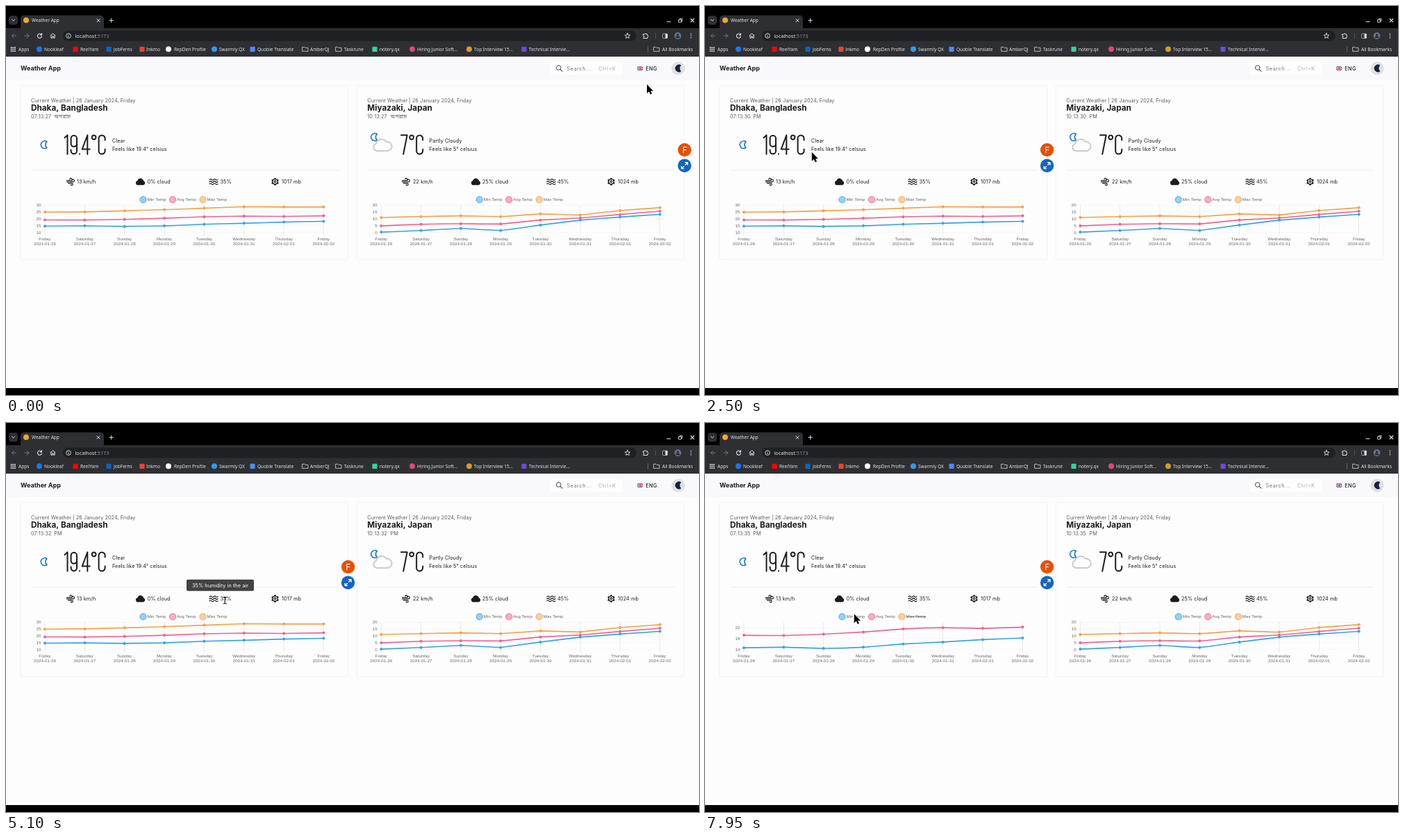
Write an HTML page with a canvas that moves like this. It is 998x561 px and loops after 8 s.

```html
<!DOCTYPE html>
<html lang="en">
<head>
<meta charset="utf-8">
<title>Weather App</title>
<style>
html, body { margin: 0; width: 100%; height: 100%; overflow: hidden; background: #000; }
canvas { display: block; width: 998px; height: 561px; }
</style>
</head>
<body>
<canvas id="stage"></canvas>
<script>
const W = 998, H = 561, LOOP = 8000;
const canvas = document.getElementById('stage');
const ctx = canvas.getContext('2d');
const dpr = window.devicePixelRatio || 1;
canvas.width = W * dpr;
canvas.height = H * dpr;

const INTER = 'Inter, sans-serif';
const UI = '"Noto Sans", sans-serif';
const CHART = '"Liberation Sans", sans-serif';
const INK = '#1d1d1f', GREY = '#5c5c60', BLUE = '#1976d2';

const clamp = v => Math.max(0, Math.min(1, v));
const mix = (a, b, k) => a + (b - a) * k;
const easeOutQuart = k => 1 - (1 - clamp(k)) ** 4;
const easeInOut = k => k * k * (3 - 2 * k);

function text(s, x, y, size, color, o = {}) {
  ctx.font = `${o.weight || 400} ${size}px ${o.family || INTER}`;
  ctx.letterSpacing = (o.spacing || 0) + 'px';
  ctx.textAlign = o.align || 'left';
  ctx.textBaseline = o.base || 'alphabetic';
  ctx.fillStyle = color;
  ctx.fillText(s, x, y);
}
const body = (s, x, y, color = INK) => text(s, x, y, 7.28, color, { spacing: 0.078 });

function box(x, y, w, h, fill, r = 0, line) {
  ctx.beginPath();
  ctx.roundRect(x, y, w, h, r);
  if (fill) { ctx.fillStyle = fill; ctx.fill(); }
  if (line) { ctx.strokeStyle = line; ctx.lineWidth = 0.6; ctx.stroke(); }
}

function disc(x, y, r, fill, line) {
  ctx.beginPath();
  ctx.arc(x, y, r, 0, 7);
  if (fill) { ctx.fillStyle = fill; ctx.fill(); }
  if (line) { ctx.strokeStyle = line; ctx.lineWidth = 0.9; ctx.stroke(); }
}

// Path relative to (x, y); stroked when a width is given, else filled
function shape(d, x, y, color, width) {
  ctx.save();
  ctx.translate(x, y);
  ctx.lineCap = ctx.lineJoin = 'round';
  const p = new Path2D(d);
  if (width) { ctx.strokeStyle = color; ctx.lineWidth = width; ctx.stroke(p); }
  else { ctx.fillStyle = color; ctx.fill(p); }
  ctx.restore();
}

const CLOUD = 'M-3.6 5A3.1 3.1 0 0 1-4.2-1.1A4.2 4.2 0 0 1 3-3.3A3 3 0 0 1 4.8-.6A2.9 2.9 0 0 1 4.3 5Z';
const MOON = 'M3.8 4.2A5.4 5.4 0 1 1 3.8-4.6A6 6 0 0 0 3.8 4.2Z';
const FOLDER = 'M-4-3h3l1 1h4v5h-8z';
const WAVE = 'q1.5-1.7 3 0t3 0t3 0t3 0';

const icons = {
  wind(x, y) {
    shape('M-5.5-1.6h6a1.6 1.6 0 1 0-1.6-1.8M-5.5.4h9.2a1.7 1.7 0 1 0-1.7-1.8M-3.5 2.5h5.3a1.5 1.5 0 1 1-1.5 1.7', x, y, INK, 1.2);
  },
  cloud(x, y) { shape(CLOUD, x, y, INK); },
  wave(x, y) {
    shape(`M-6-2.8${WAVE}M-6 .3${WAVE}M-6 3.4${WAVE}`, x, y, INK, 1.2);
  },
  gear(x, y) {
    for (let i = 0; i < 6; i++) {
      const a = i * Math.PI / 3 + Math.PI / 6;
      disc(x + 4 * Math.cos(a), y + 4 * Math.sin(a), 1.5, INK);
    }
    disc(x, y, 4.3, INK);
    disc(x, y, 3, '#fdfdfd');
    disc(x, y, 1.9, INK);
    disc(x, y, 0.8, '#fdfdfd');
  }
};

// Tall condensed numerals, 30 units high
const GLYPHS = {
  '1': ['M1 5L5 1.3V28.7', 8.5],
  '9': ['M10 13.5a4.2 4.2 0 0 1-8.4 0V6a4.2 4.2 0 0 1 8.4 0V24a4.2 4.2 0 0 1-8.4 0v-1.5', 13],
  '.': ['M1 28.3v.3', 3.7],
  '4': ['M8.6 28.7V1.3L1 21.5H12', 14],
  '7': ['M1 1.3H9.7L4.2 28.7', 12.3],
  '°': ['M1 4.4a2.9 3 0 1 1 5.8 0a2.9 3 0 1 1-5.8 0', 9.3],
  'C': ['M10.6 8.5V6a4.5 4.5 0 0 0-9 0V24a4.5 4.5 0 0 0 9 0V21.5', 12]
};
function bigText(s, x, y) {
  for (const c of s) {
    const [d, step] = GLYPHS[c];
    shape(d, x, y, INK, 2);
    x += step;
  }
}

// label, icon x, label x, icon colour, icon kind
const BOOKMARKS = [
  ['Nookleaf', 48, 55, '#1877f2', 'disc'],
  ['ReelYam', 100, 107, '#f00', 'square'],
  ['JobFerns', 148, 155, '#0a66c2', 'square'],
  ['Inkmo', 196, 202, '#ea4335', 'square'],
  ['RepDen Profile', 234, 242, '#fff', 'disc'],
  ['Swarmly QX', 300, 307, '#2f9be8', 'disc'],
  ['Quoble Translate', 355, 362, '#4c8bf5', 'square'],
  ['AmberQJ', 431, 438, '#c8c9cc', 'folder'],
  ['Taskrune', 479, 487, '#c8c9cc', 'folder'],
  ['notery.qx', 531, 538, '#34d399', 'square'],
  ['Hiring Junior Soft...', 585, 592, '#e0457b', 'disc'],
  ['Top Interview 15...', 667, 674, '#d99a2b', 'disc'],
  ['Technical Intervie...', 746, 753, '#6d4bd8', 'square'],
  ['All Bookmarks', 937, 945, '#c8c9cc', 'folder']
];

function drawBrowser() {
  const pale = '#e4e5e8', dim = '#75767b';
  box(0, 0, W, 73, '#000');
  box(4, 14, 13, 13, '#2e2f33', 4);
  shape('M-2-1L0 1L2-1', 10.5, 20.5, pale, 1);
  box(21, 13.5, 120, 24, '#2e2f33', 5);
  disc(29, 20.5, 4, '#e7a936');
  text('Weather App', 37, 23.2, 6.5, pale, { family: UI });
  shape('M-2-2L2 2M2-2L-2 2', 133, 20.8, pale, 1);
  shape('M-2.7 0H2.7M0-2.7V2.7', 151.7, 20.8, pale, 1);
  shape('M-2.5 2H2.5', 954.5, 20.8, pale, 1.1);
  shape('M-2.3-1h3.5v3.5h-3.5zM-1-1v-1.5h3.6v3.6h-1.2', 971.3, 20.8, pale, 0.9);
  shape('M-2.3-2.3L2.3 2.3M2.3-2.3L-2.3 2.3', 988.5, 20.8, pale, 1.2);

  box(0, 32, W, 41, '#2e2f33');
  shape('M3 0H-3M0-3L-3 0L0 3', 11.5, 43, dim, 1);
  shape('M-3 0H3M0-3L3 0L0 3', 30, 43, dim, 1);
  shape('M2.7-1.5A3.1 3.1 0 1 0 3 1M3-3.4V-1H.7', 48.5, 43, pale, 1.1);
  shape('M-3.4-.3L0-3.5L3.4-.3M-2.6-1V3.2H-.8V.8H.8V3.2H2.6V-1', 67.5, 43, pale, 1);
  box(82, 35.5, 826, 15, '#1f2023', 7.5);
  disc(90, 43, 3.4, null, pale);
  shape('M0-1.6v.1M0 0V1.7', 90, 43, pale, 0.9);
  text('localhost', 99.5, 45.6, 7.2, pale, { family: UI });
  const end = ctx.measureText('localhost').width;
  text(':5173', 99.5 + end, 45.6, 7.2, '#8f9095', { family: UI });
  shape('M0-3.8L1.1-1.2L3.8-1L1.7.8L2.4 3.5L0 2L-2.4 3.5L-1.7.8L-3.8-1L-1.1-1.2Z', 895, 43, pale, 0.9);
  shape('M-3-2.3h2a1 1 0 1 1 2 0h1.8v2a1 1 0 1 1 0 2v1.8h-5.8v-1.8a1 1 0 0 0 0-2z', 921, 43, pale, 1);
  box(935, 39, 0.7, 8, '#606166');
  box(945.5, 40, 7, 6.5, null, 1, pale);
  box(949.5, 40, 3, 6.5, pale);
  disc(967.5, 43, 4.9, '#66748a');
  disc(967.5, 41.5, 1.6, '#252a35');
  shape('M-3 3.2a3 3 0 0 1 6 0z', 967.5, 43, '#252a35');
  for (let i = -1; i < 2; i++) disc(986.5, 43 + i * 2.8, 0.8, pale);

  for (let i = 0; i < 9; i++)
    box(6.8 + (i % 3) * 2.6, 59 + Math.floor(i / 3) * 2.6, 1.7, 1.7, pale);
  text('Apps', 18, 64.9, 6.5, pale, { family: UI });
  for (const [name, ix, tx, color, kind] of BOOKMARKS) {
    if (kind === 'disc') disc(ix, 62.3, 4, color);
    else if (kind === 'square') box(ix - 3.6, 58.8, 7.2, 7.2, color, 1);
    else shape(FOLDER, ix, 62.3, color, 0.9);
    text(name, tx, 64.9, 6.55, pale, { family: UI });
  }
  box(924, 58, 0.7, 9, '#77787c');
}

function drawHeader() {
  box(0, 73, W, 478, '#fdfdfd');
  box(0, 73, W, 34, '#f9f9fc');
  text('Weather App', 21, 93, 9.05, INK, { weight: 700 });
  box(784, 81, 104, 18, '#fefefe', 2);
  disc(795.8, 89, 3.3);
  ctx.strokeStyle = '#444';
  ctx.lineWidth = 1;
  ctx.stroke();
  shape('M0 0L2.7 2.7', 798.3, 91.4, '#444', 1.1);
  text('Search...', 807.5, 93, 7.28, '#707074', { spacing: 0.6 });
  text('Ctrl+K', 853, 93, 7.28, '#a8a8ac', { spacing: 0.6 });
  box(909.3, 87, 7.8, 6, '#26407f', 0.8);
  shape('M-3.5-2.6L3.5 2.6M3.5-2.6L-3.5 2.6', 913.2, 90, '#fff', 0.9);
  shape('M-3.7 0H3.7M0-2.8V2.8', 913.2, 90, '#fff', 2);
  shape('M-3.7 0H3.7M0-2.8V2.8', 913.2, 90, '#d0213c', 1.1);
  text('ENG', 921.3, 93, 7.28, INK, { weight: 500, spacing: 0.4 });
  disc(968, 90, 9.6, '#dfe0e4');
  shape(MOON, 968.5, 90, '#17223b');
  box(0, 551, W, 10, '#000');
}

const DAYS = ['Friday', 'Saturday', 'Sunday', 'Monday', 'Tuesday', 'Wednesday', 'Thursday', 'Friday'];
const DATES = ['01-26', '01-27', '01-28', '01-29', '01-30', '01-31', '02-01', '02-02'];
const SERIES = [
  ['Min Temp', 141.5, '54,162,235'],
  ['Avg Temp', 184, '240,98,140'],
  ['Max Temp', 227.5, '248,160,72']
];
const FLOOR = 326.5, GAP = 57.34, HIDE_AT = 7080;

const CARDS = [
  {
    x: 21, place: 'Dhaka, Bangladesh', hour: '07', lead: 650, temp: '19.4°C', tempX: 83.5, noteX: 153,
    sky: 'Clear', feels: 'Feels like 19.4° celsius',
    facts: [['wind', 93, 102, '13 km/h'], ['cloud', 193.5, 203.5, '0% cloud'], ['wave', 299, 308.5, '35%'], ['gear', 387.5, 397, '1017 mb']],
    lo: 10, hi: 30, ticks: [10, 15, 20, 25, 30],
    data: [
      [14.6, 14.8, 14.4, 14.8, 16, 16.7, 17.6, 18.2],
      [19.2, 19.1, 19.6, 20.4, 21.5, 22, 21.75, 22.2],
      [24.9, 25.1, 25.9, 26.7, 27.8, 28.9, 28.7, 28.7]
    ],
    rescale: { lo: 14, hi: 24, ticks: [14, 18, 22] }
  },
  {
    x: 505.3, place: 'Miyazaki, Japan', hour: '10', lead: 590, temp: '7°C', tempX: 568, noteX: 609.5,
    sky: 'Partly Cloudy', feels: 'Feels like 5° celsius',
    facts: [['wind', 576, 586, '22 km/h'], ['cloud', 676.5, 686, '25% cloud'], ['wave', 785, 794, '45%'], ['gear', 871.5, 881, '1024 mb']],
    lo: 0, hi: 20, ticks: [0, 5, 10, 15, 20],
    data: [
      [0.2, 1.4, 2.9, 1.4, 5.4, 9, 11.3, 13.3],
      [4.8, 6, 6.4, 6.2, 9.1, 10.6, 13.2, 15.6],
      [11, 11.6, 12.2, 11.6, 13.6, 12.8, 16.1, 18.2]
    ]
  }
];

const yAt = (v, s) => FLOOR - (v - s.lo) / (s.hi - s.lo) * 39.2;

// Line tension pulses once a second
function tensionAt(t) {
  const d = Math.abs((t % 1000) - 800);
  return 0.4 * clamp(1 - Math.min(d, 1000 - d) / 250);
}

function drawLine(pts, rgb, alpha, tension) {
  const ctrl = (i, dir) => {
    if (i === 0 || i === pts.length - 1) return pts[i];
    const k = dir * tension / 2;
    return [0, 1].map(a => pts[i][a] + k * (pts[i + 1][a] - pts[i - 1][a]));
  };
  ctx.globalAlpha = alpha;
  ctx.beginPath();
  ctx.moveTo(...pts[0]);
  for (let i = 1; i < pts.length; i++)
    ctx.bezierCurveTo(...ctrl(i - 1, 1), ...ctrl(i, -1), ...pts[i]);
  ctx.strokeStyle = `rgb(${rgb})`;
  ctx.lineWidth = 1.6;
  ctx.lineJoin = 'round';
  ctx.stroke();
  for (const p of pts) disc(p[0], p[1], 2, `rgb(${rgb})`);
  ctx.globalAlpha = 1;
}

function drawChart(card, t) {
  const left = card.x + 35;
  const hidden = card.rescale && t >= HIDE_AT;
  const k = hidden ? easeOutQuart((t - HIDE_AT) / 1000) : 0;
  const scale = hidden ? card.rescale : card;
  const opts = { family: CHART, base: 'middle' };

  SERIES.forEach(([name, dx, rgb], i) => {
    const x = card.x + dx + 35;
    disc(x, 279.3, 4.6, `rgba(${rgb},.5)`, `rgb(${rgb})`);
    text(name, x + 6, 279.3, 6.24, '#666', opts);
    if (hidden && i === 2) box(x + 6, 278.8, ctx.measureText(name).width, 0.8, '#666');
  });

  for (const v of scale.ticks) {
    const y = yAt(v, scale);
    box(left - 4, y - 0.25, 7 * GAP + 4, 0.5, 'rgba(0,0,0,.05)');
    text(v, left - 5.5, y + 0.3, 6.24, '#666', { ...opts, align: 'right' });
  }
  DAYS.forEach((day, i) => {
    const x = left + i * GAP;
    box(x - 0.3, 287.3, 0.6, 43.2, 'rgba(0,0,0,.13)');
    text(day, x, 336.4, 6.24, '#666', { ...opts, align: 'center' });
    text('2024-' + DATES[i], x, 343.6, 6.24, '#666', { ...opts, align: 'center' });
  });

  ctx.save();
  ctx.beginPath();
  ctx.rect(left - 4, 285.5, 7 * GAP + 8, 45);
  ctx.clip();
  for (let s = 2; s >= 0; s--) {
    const pts = card.data[s].map((v, i) => [left + i * GAP, mix(yAt(v, card), yAt(v, scale), k)]);
    drawLine(pts, SERIES[s][2], s === 2 ? 1 - k : 1, tensionAt(t));
  }
  ctx.restore();
}

function drawCard(card, t) {
  const x = card.x + 15;
  box(card.x, 114.7, 471.5, 251, '#fdfdfe', 1, '#ececf1');
  body('Current Weather | 26 January 2024, Friday', x, 139, GREY);
  text(card.place, x, 151.2, 11.75, INK, { weight: 700 });
  const sec = 27 + Math.floor((t + card.lead) / 1000);
  body(`${card.hour}:13:${sec}`, x, 161.5, GREY);
  text(sec === 27 ? 'অপরাহ্ন' : 'PM', x + 33.3, 161.5, 7.28, GREY,
    { family: 'Inter, "Noto Sans Bengali", "Noto Sans", sans-serif', spacing: 0.078 });

  if (card.sky === 'Clear') shape(MOON, 55, 200.3, BLUE, 1.7);
  else {
    shape(MOON, 530.5, 189.3, BLUE, 1.7);
    shape('M-8 9A5.4 5.4 0 0 1-8.8-1.4A8.2 8.2 0 0 1 6-4.2A6.4 6.4 0 0 1 8.2 9Z', 541.8, 200, '#fdfdfe');
    shape('M-8 9A5.4 5.4 0 0 1-8.8-1.4A8.2 8.2 0 0 1 6-4.2A6.4 6.4 0 0 1 8.2 9Z', 541.8, 200, '#cbcbcd', 2);
  }
  bigText(card.temp, card.tempX, 185);
  body(card.sky, card.noteX, 197);
  body(card.feels, card.noteX, 209);
  box(x, 236.6, 443, 0.6, '#e6e6ea');
  for (const [icon, ix, tx, label] of card.facts) {
    icons[icon](ix, 253.2);
    body(label, tx, 256);
  }
  drawChart(card, t);
}

// label, centre x, fade-in start, fade-out start
const TIPS = [
  ['0% of the sky is cloudy', 212, 3310, 4285],
  ['35% humidity in the air', 308.5, 4490, 5250],
  ['1017 millibar pressure in the air', 403.7, 5420, 6150]
];
function drawTips(t) {
  for (const [label, x, on, off] of TIPS) {
    const a = Math.min(clamp((t - on) / 200), 1 - clamp((t - off) / 200));
    if (a <= 0) continue;
    ctx.globalAlpha = a;
    ctx.font = '400 7.28px ' + INTER;
    ctx.letterSpacing = '0.078px';
    const w = ctx.measureText(label).width;
    box(x - w / 2 - 8, 225.8, w + 16, 16.5, '#424242', 2);
    body(label, x - w / 2, 236.7, '#fff');
    ctx.globalAlpha = 1;
  }
}

const PATH = [
  [0, 923, 113], [150, 923, 113], [850, 300, 185], [1350, 136, 201], [2200, 136, 201],
  [3300, 233, 254], [4150, 233, 254], [4400, 312, 256], [5050, 312, 256], [5500, 402, 254],
  [5950, 402, 254], [6850, 283.7, 281.5], [7180, 283.7, 281.5], [7600, 214.8, 275.5], [LOOP, 214.8, 275.5]
];
function pointerAt(t) {
  const i = PATH.findIndex(p => p[0] > t);
  const [a, b] = [PATH[i - 1], PATH[i]];
  const k = easeInOut((t - a[0]) / (b[0] - a[0]));
  return [mix(a[1], b[1], k), mix(a[2], b[2], k)];
}
function drawPointer(x, y, t) {
  const beam = (t > 1300 && t < 2250) || (t > 3200 && t < 6050);
  if (beam) {
    const d = 'M-2-4.8Q0-4.8 0-3.6Q0-4.8 2-4.8M0-3.6V3.6M-2 4.8Q0 4.8 0 3.6Q0 4.8 2 4.8';
    shape(d, x, y, '#fff', 2);
    shape(d, x, y, '#111', 1.1);
  } else {
    const d = 'M0 0V13L3 10.3L5 14.6L7.2 13.6L5.3 9.4H9.2Z';
    shape(d, x, y, '#fff', 1.2);
    shape(d, x, y, '#000');
  }
}

function drawFloaters(x) {
  disc(x, 207.5, 9.7, '#e65100');
  text('F', x, 208, 12, '#fff', { family: 'Roboto, sans-serif', align: 'center', base: 'middle' });
  disc(x, 230.2, 9.7, '#1565c0');
  shape('M1.2-1.2L4.2-4.2M1.2-4.4H4.4V-1.2M-1.2 1.2L-4.2 4.2M-1.2 4.4H-4.4V1.2', x, 230.2, '#fff', 1.4);
}

function draw(t) {
  ctx.setTransform(dpr, 0, 0, dpr, 0, 0);
  drawBrowser();
  drawHeader();
  for (const card of CARDS) drawCard(card, t);
  const [x, y] = pointerAt(t);
  drawTips(t);
  drawFloaters(t < 1000 && x > 498 ? 977.2 : 492.6);
  drawPointer(x, y, t);
}

const start = performance.now();
function frame() {
  draw((performance.now() - start) % LOOP);
  requestAnimationFrame(frame);
}
frame();
</script>
</body>
</html>
```
